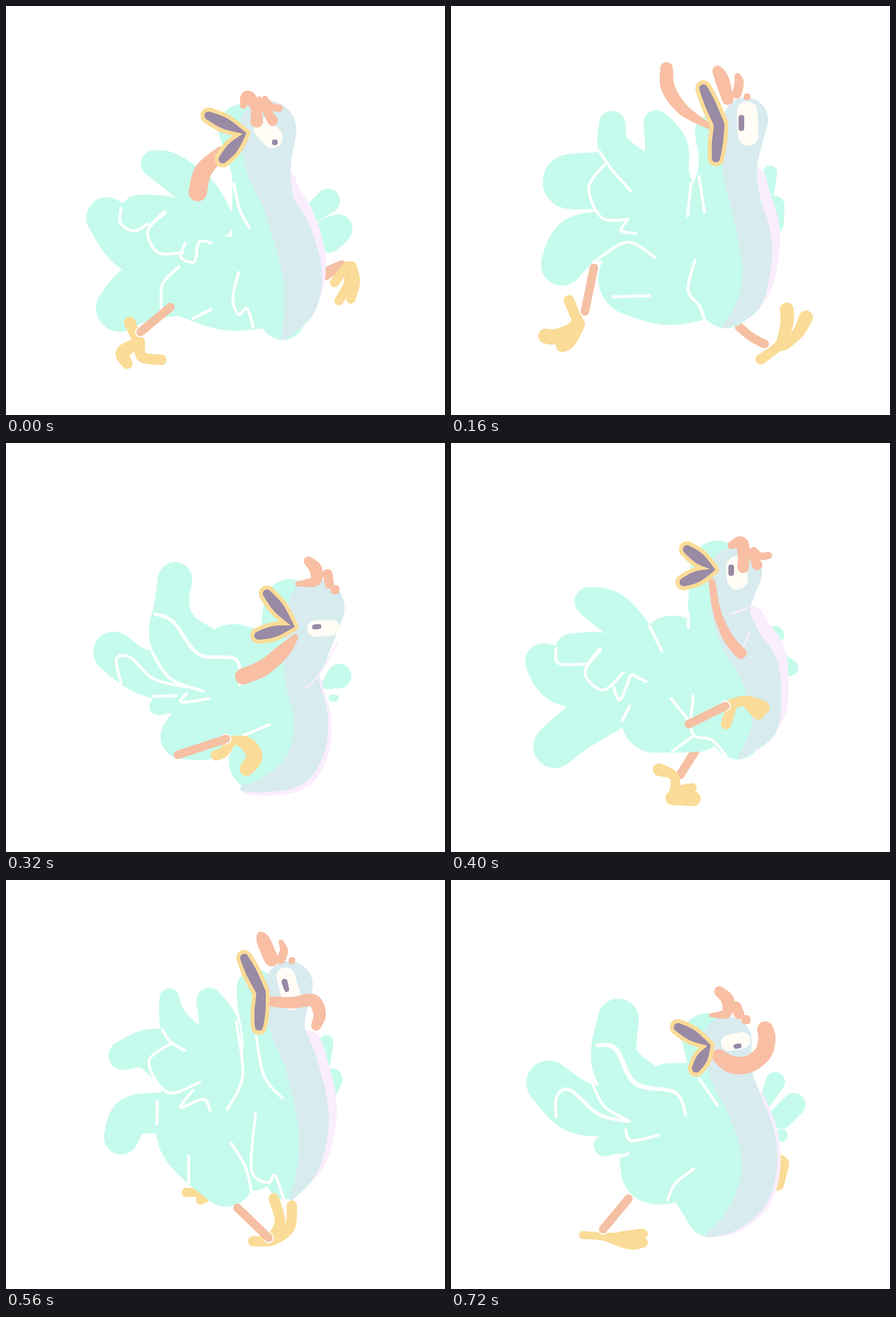
Animation of 774x720 px, one loop 800 ms. Source, as an HTML page with a canvas:

```html
<!DOCTYPE html>
<html lang="en">
<head>
<meta charset="utf-8">
<title>Running bird</title>
<style>
html, body { margin: 0; width: 100%; height: 100%; overflow: hidden; background: #fff; }
canvas { display: block; width: 100vw; height: 100vh; }
</style>
</head>
<body>
<canvas id="stage" width="774" height="720"></canvas>
<script>
const WHITE = '#fff', MINT = '#c5fbec', PEACH = '#f8bfa4', LEG = '#f5c0a3', YELLOW = '#fadc98', PLUM = '#9a8ba5', PINK = '#faedfd';

// Paint order, back to front: [colour, usual radius]
const STYLE = {
  wing: [MINT, 14], farLeg: [LEG, 7.5], farFoot: [YELLOW, 8], pink: [PINK, 0],
  body: [MINT, 40], belly: ['#d8ebef', 30], line: [WHITE, 2.4], crease: [PINK, 1.3],
  eye: ['#fffdf5', 18], pupil: [PLUM, 5], wattle: [PEACH, 14],
  beak: [YELLOW, 0], mouth: [PLUM, 0], comb: [PEACH, 8],
  foot: [YELLOW, 9], halo: [WHITE, 9.5], leg: [LEG, 7.3]
};

// The bird is built of tubes: a smooth spine of "x,y" or "x,y,radius" joints; bars part the tubes.
// beak: upper tip, hinge, lower tip. pink: how far the shade is moved from the belly.
const reach = {
  body: '178,373,36 230,420,50 320,430,70|200,532,41 242,502,52 320,480,62|260,277,22 290,290,31 340,330,33 372,378,30|234,366,33 280,380,45 330,400,50|330,480,70 390,488,82 430,490,80|416,215,42 430,300,31 455,390,55 475,470,72 488,548,40',
  belly: '461,218,51 463,285,39 481,348,28 504,400,34 522,470,35 518,530,27 489,584,4',
  pink: '7,-22',
  wing: '535,368,16 568,343,21|560,385,10 588,390,22 570,412,22',
  farLeg: '562,472,11 592,455,7',
  farFoot: '603,457 590,472 579,487|606,458 603,490 587,519|610,458 616,485 608,516',
  line: '203,356 202,382 225,396 250,384|279,364,4 250,396 268,434 312,434|316,418 308,442 332,450 340,416 362,417|305,459 276,490 274,535|362,534 330,550|410,469 400,515 410,543 425,533 436,566|402,313 412,358 429,390',
  eye: '455,216 470,232', pupil: '474,240',
  wattle: '380,258,11 348,290,15 338,328,16',
  beak: '357,193 422,224 382,270',
  comb: '418,176,5 426,160,11 440,178,9 442,203,11|446,162,3 460,185,7 470,202,9|456,162,4 468,177,6 482,180,6',
  foot: '218,557,10 228,580 236,592|234,592 206,610,12 214,630|236,595 240,618 274,623',
  leg: '290,530 237,574'
};

const leap = {
  body: '174,475,26 195,425,38 240,372,44 300,345,60|258,488,21 278,450,40 310,420,50|327,177,25 355,205,32 380,258,34|246,235,23 290,232,25 340,260,30|300,288,35 350,290,50 400,300,70|315,410,60 390,400,77 450,400,75|435,130,40 447,180,25 455,250,45 470,340,70 480,420,70 488,465,30',
  belly: '472,135,42 489,205,31 511,270,25 537,335,34 548,400,29 536,450,22 504,493,3',
  pink: '8,-4',
  wing: '545,272,11|568,306,8 588,313,13',
  farLeg: '570,417 613,412,6',
  farFoot: '622,412 640,407 684,406,11|655,411 668,422 668,441,10|622,414 612,438,10',
  line: '272,256 300,253 330,264|265,298 285,325 336,323|322,333 333,349 352,323|342,381 290,372 255,403 266,445 298,470|376,446 342,467|436,394 427,435 448,453 465,488|404,225 418,283|442,207 427,208 433,252',
  eye: '476,119 482,140', pupil: '469,123 469,127',
  wattle: '325,143 348,112 385,122,11 420,148,6',
  beak: '384,110 443,143 413,188',
  comb: '440,102 446,80,13 452,58,12|463,92 477,71,10|482,96',
  foot: '185,378,11 182,405,12 165,440,13 140,466,11 128,473,5|160,447,13 122,450,12',
  leg: '255,415 192,419'
};

const land = {
  body: '210,309,48 270,310,52 320,330,60|196,455,37 225,415,45 290,400,40|284,208,23 288,250,28 330,310,45 350,390,60|362,206,22 380,250,37 378,310,44 400,400,60|325,480,65 380,490,71 430,480,74|462,222,32 462,285,25 470,360,50 475,440,60 485,520,47',
  belly: '520,200,39 509,280,31 518,340,27 536,410,29 538,470,24 524,525,20 482,564,4',
  pink: '14,-20',
  wing: '557,330,12 563,293,12|570,352,18 572,385,14',
  farLeg: '508,565 530,583 553,595',
  farFoot: '546,622,9 570,605 585,590|580,600 592,560,11 592,534,12|588,598 612,575,10 626,548,12',
  line: '262,256 285,290 318,326|270,280 243,320 265,372 312,376|312,375 300,395 326,400|360,443 310,416 250,452|430,448 418,500 438,528 448,556|205,362 248,360|285,512 350,510|423,312 417,370|437,300 447,363',
  eye: '522,186 524,228', pupil: '512,197 512,215',
  wattle: '380,110,11 383,145,12 410,183,10 456,212,5',
  beak: '445,145 473,209,9 467,268',
  comb: '488,164,10 478,130,12 470,114,9|504,155 508,135 505,123,5|522,160,6',
  foot: '208,518 217,540 225,556|224,560,12 205,587,16 196,598,11|215,570,12 185,582,13 167,581,13',
  leg: '252,461 236,538'
};

const crouch = {
  body: '190,368,36 235,400,38 300,415,45|268,464,15 310,452,22 360,450,40|298,240,30 292,290,31 300,340,46 345,385,60|312,517,39 370,485,68 420,430,90|400,378,59 440,390,62|500,285,45 485,370,45 460,460,60 445,560,52',
  belly: '547,290,50 530,365,39 522,415,30 537,480,30 533,535,30 508,578,27 455,602,13 418,608,5',
  pink: '6,6',
  wing: '565,425,8 588,410,21|575,449,6 582,449,5',
  farLeg: '470,530 450,560',
  farFoot: '470,570 450,575|470,570 480,550|470,570 490,565',
  line: '263,301,3 295,315,3 340,372,3 405,381,3 412,427|320,430 260,415 220,378 195,380 203,425|318,441 310,456 358,450|464,496 418,515|398,535 385,565|257,368 290,415 348,437|260,446 300,445',
  crease: '585,350 550,410 527,432',
  eye: '545,327,14 574,325,14', pupil: '544,324,4 552,323,4',
  wattle: '418,411 455,395 490,365,12 510,342,5',
  beak: '460,265 507,323 445,339',
  comb: '514,248,4 545,243,9 546,222,11 533,208|567,230 570,248|580,258',
  foot: '400,522,6 425,530,12 438,553,14 424,574,12|396,525 385,543 370,550',
  leg: '303,549 388,521'
};

const pass = {
  body: '163,385,32 205,412,50 280,410,55|183,534,38 222,502,40 300,450,45|243,279,25 285,300,36 340,355,30|212,364,28 260,380,46 330,390,50|390,362,58 430,400,80|360,485,60 430,480,64|470,220,48 460,290,42 475,380,60 495,460,65 505,515,42',
  belly: '502,228,46 493,295,34 513,350,35 541,395,36 553,450,29 551,503,22 510,553,4',
  pink: '13,-22',
  wing: '560,352,10 571,338,16|585,380,8 598,396,14',
  farLeg: '432,540 404,584',
  farFoot: '367,575,11 392,585 395,605 388,628|390,625,12 427,626,13|395,612 425,607',
  line: '185,362 190,388 238,389|262,364,4 236,405 268,435 304,404|317,408 298,452 287,430|320,408 344,420|350,322 372,367|418,298 419,325|315,463 302,488|388,450 422,492|427,445 425,510 460,523 485,550|390,543 425,517',
  crease: '494,301 524,290|527,335 515,360',
  eye: '503,218 505,240', pupil: '494,219 494,229',
  wattle: '460,245,6 470,300,7 490,345,9 511,370,10',
  beak: '416,187 464,223 410,245',
  comb: '494,180,6 512,176,11 516,200,10 515,219,10|528,190,4 540,215,9|534,188,5 546,199,6 560,198,6',
  foot: '494,460 520,454 550,466,12|525,460 542,476,11|495,462 485,495',
  leg: '419,495 484,463'
};

const stretch = {
  body: '206,309,25 250,298,34 310,320,55|203,453,30 225,415,35 300,410,35|288,208,17 295,245,24 330,310,45|358,212,22 375,255,34 375,320,45 400,400,60|330,400,62 335,455,65 388,527,48|400,350,50 430,480,67|440,190,33 440,215,32 455,290,35 470,370,55 485,460,60 493,530,32',
  belly: '499,185,42 496,258,31 519,320,29 539,400,29 541,460,24 529,515,17 503,560,4',
  pink: '14,-15',
  wing: '562,320,10 565,285,12|575,350,18 572,372,12',
  farFoot: '318,550 340,550|343,563 350,560',
  line: '276,264 290,285 315,300|292,287 252,320 285,374 342,356|330,370 308,400 348,386 360,406|397,463 422,505 433,548|441,275 455,345 487,384|406,250 417,345 390,404|267,390 266,430|440,410 433,510 462,533 474,520 490,562|322,486 322,533',
  eye: '493,170,16 505,212,17', pupil: '491,179 495,193,4',
  wattle: '470,214,9 505,216,10 541,212,11 553,235,11 547,256,9',
  beak: '420,137 450,198,8 446,258',
  comb: '468,140,12 455,110,12 450,99|484,140 490,125,7 485,109,4|504,142,6',
  foot: '436,636 470,634 500,612 504,573|473,625 483,600 472,560',
  leg: '408,577 463,630'
};

const push = {
  body: '172,357,39 225,400,46 300,410,40|270,468,18 310,455,25 360,455,40|295,245,36 290,320,42 345,385,55|345,450,50 352,515,50 400,490,75|385,380,57 430,390,67|430,545,40 452,594,33|450,278,43 455,350,35 465,430,65 460,520,65 452,594,33',
  belly: '487,283,43 494,340,37 515,390,33 538,450,33 543,510,31 528,562,28 490,605,16 452,625,4',
  pink: '6,1',
  wing: '555,390,10 572,355,17|582,418,20 605,395,20|582,450,11',
  farFoot: '580,500,16 575,535,12',
  line: '257,291,3 290,297,4 325,358,4 395,374,3 414,413|310,425 260,412,3 210,370,3 187,380 185,417|308,440 318,459 366,449|428,508 395,535 382,563|438,350 470,397|248,355 270,398 315,425|287,490 312,482',
  eye: '490,287,14 514,282,14', pupil: '502,293,3.5 508,292,4',
  wattle: '472,310,12 495,325,15 525,324,15 550,305,15 557,280,15 554,263',
  beak: '400,259 456,291 432,332',
  comb: '458,238,3 485,235 488,212,11 473,196,9|503,222 508,236,9|520,246',
  foot: '233,625,7 270,628,7 315,636,14 338,638|300,628 338,623',
  leg: '313,561 268,615'
};

const N = 60;
const lerp = (a, b, t) => a + (b - a) * t;
const mixPoint = (p, q, t) => p.map((v, k) => lerp(v, q[k], t));
const move = (tube, dx, dy, grow = 0) => tube.map(([x, y, r]) => [x + dx, y + dy, r + grow]);

// N samples [x, y, radius] of a smooth spine
function tube(joints) {
  const last = joints.length - 1;
  const at = i => joints[Math.max(0, Math.min(last, i))];
  return Array.from({ length: N }, (_, n) => {
    const f = last * n / (N - 1), i = Math.min(Math.floor(f), Math.max(0, last - 1)), t = f - i;
    const [a, b, c, d] = [at(i - 1), at(i), at(i + 1), at(i + 2)];
    return b.map((v, k) => v + t / 2 * (c[k] - a[k] + t * (2 * a[k] - 5 * v + 4 * c[k] - d[k] + t * (3 * (v - c[k]) + d[k] - a[k]))));
  });
}

const parse = (text, radius) => text.split(' ').map(s => {
  const [x, y, r = radius] = s.split(',').map(Number);
  return [x, y, r];
});

function jaw([x, y], hinge) {
  const mid = mixPoint([x, y, 9], hinge, 0.45);
  return tube([[x, y, 7], [mid[0], mid[1], 9.5], hinge]);
}

function build(pose) {
  const parts = {};
  for (const name in pose) {
    if (name !== 'beak' && name !== 'pink') {
      parts[name] = pose[name].split('|').map(s => tube(parse(s, STYLE[name][1])));
    }
  }
  const [upper, hinge, lower] = parse(pose.beak, 1.5);
  parts.mouth = [jaw(upper, hinge), jaw(lower, hinge)];
  parts.beak = parts.mouth.map(j => move(j, 0, 0, 7));
  const [dx, dy] = pose.pink.split(',').map(Number);
  parts.pink = [move(parts.belly[0].slice(N * 0.3), dx, dy)];
  const [x, y] = parts.leg[0][N - 1];
  parts.halo = [[[x, y, STYLE.halo[1]]]];
  return parts;
}

function blend(a, b, t) {
  const parts = {};
  for (const name in a) {
    if (!b[name]) continue;
    const count = Math.min(a[name].length, b[name].length);
    parts[name] = a[name].slice(0, count).map((p, i) => p.map((v, k) => mixPoint(v, b[name][i][k], t)));
  }
  return parts;
}

const shift = (parts, dx, dy) => Object.fromEntries(
  Object.entries(parts).map(([name, tubes]) => [name, tubes.map(p => move(p, dx, dy))]));

const [r, l, d, c, p, s, u] = [reach, leap, land, crouch, pass, stretch, push].map(build);

// Second leap: same flight, legs swapped
const { leg, foot, halo, farFoot } = blend(p, s, 0.5);
const swapped = shift({ leg, foot, halo, farFoot, farLeg: p.farLeg }, 10, -75);
const leap2 = { ...shift(l, 5, -21), ...swapped };

const frames = [r, l, d, blend(d, c, 0.5), c, p, leap2, s, blend(s, u, 0.5), u];
const ctx = document.getElementById('stage').getContext('2d');
ctx.lineCap = 'round';

function drawTube(pts) {
  pts.forEach(([x, y, radius], i) => {
    const [px, py] = pts[Math.max(0, i - 1)];
    ctx.lineWidth = Math.max(0.5, radius * 2);
    ctx.beginPath();
    ctx.moveTo(px, py);
    ctx.lineTo(x + 0.01, y);
    ctx.stroke();
  });
}

function paint(parts) {
  ctx.fillStyle = WHITE;
  ctx.fillRect(0, 0, 774, 720);
  for (const name in STYLE) {
    ctx.strokeStyle = STYLE[name][0];
    (parts[name] || []).forEach(drawTube);
  }
}

const STEP = 80;
let shown = -1;

function draw(time) {
  const i = Math.floor(time / STEP) % frames.length;
  if (i !== shown) paint(frames[shown = i]);
}

let start = null;
function tick(now) {
  if (start === null) start = now;
  draw(Math.max(0, now - start));
  requestAnimationFrame(tick);
}
draw(0);
requestAnimationFrame(tick);
</script>
</body>
</html>
```
